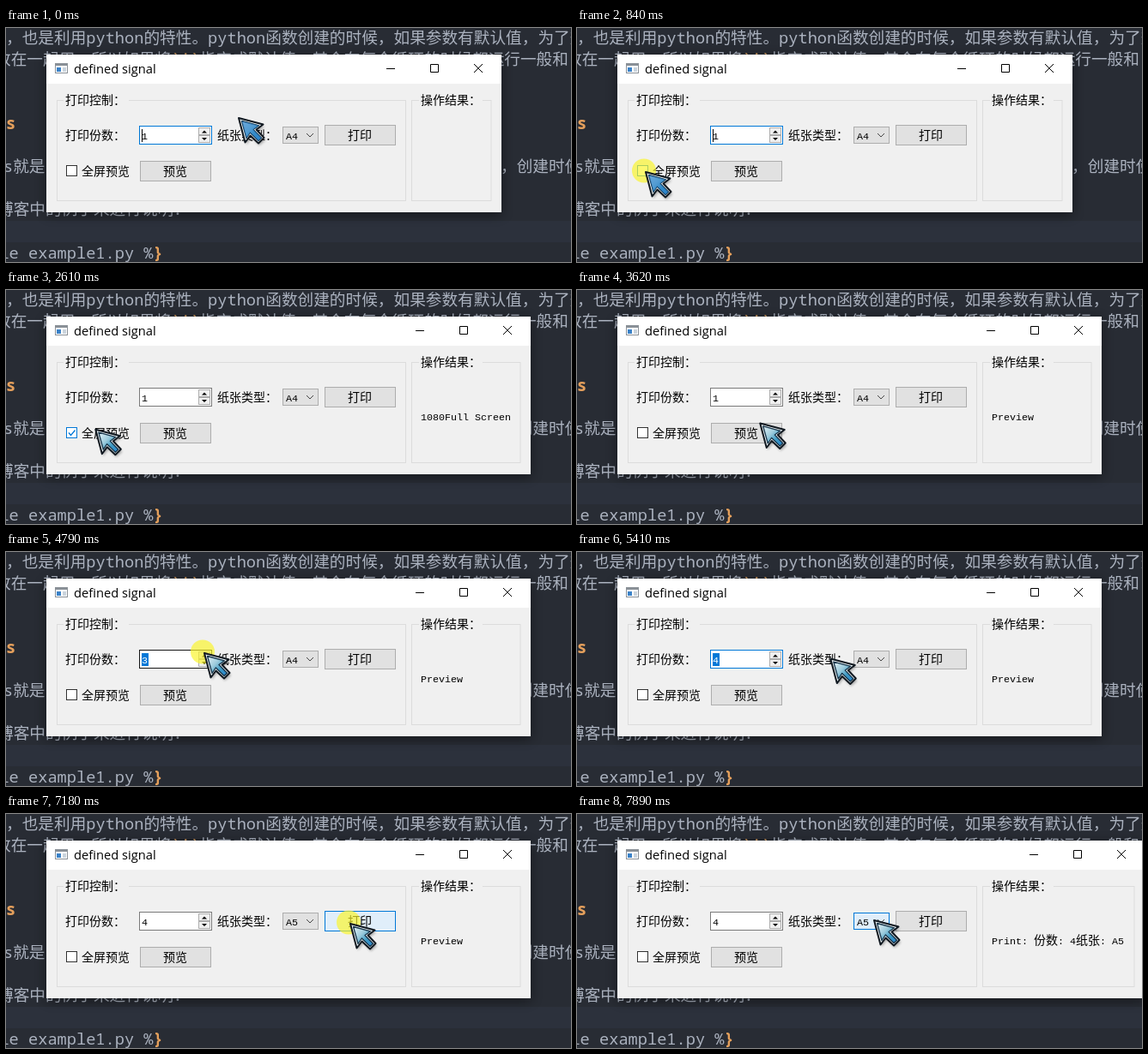
Write an HTML page that moves like this. It is 658 px wide and 273 px high and loops after 8000 ms.

```html
<!DOCTYPE html>
<html lang="zh-CN">
<head>
<meta charset="utf-8">
<style>
  html, body { margin: 0; width: 100%; height: 100%; overflow: hidden; background: #282c34; }
  svg { display: block; width: 658px; height: 273px; }
  text { white-space: pre; }
  .code { font: 18.67px "Noto Sans Mono", "Noto Sans CJK SC", monospace; fill: #abb2bf; }
  .code .hot { fill: #e5a05c; font-weight: 700; }
  .title { font: 14.7px "Open Sans", sans-serif; }
  .cjk { font: 14px "Noto Sans CJK SC", sans-serif; }
  .latin { font: 11.67px "Liberation Mono", monospace; }
  .line { fill: none; stroke: #000; }
  .group { fill: none; stroke: #dcdcdc; }
  .edge { stroke: #adadad; }
</style>
</head>
<body>
<svg id="stage" viewBox="0 0 658 273"></svg>
<script>
const LOOP = 8000;
const BLUE = '#0078d7';
const stage = document.getElementById('stage');

// Interface text: wide characters and half-width ones use two fonts on one pitch.
const runs = s => s.replace(/[\u2e80-\uffff]+|[^\u2e80-\uffff]+/g, run =>
  `<tspan class="${run.charCodeAt(0) > 0x2e7f ? 'cjk' : 'latin'}">${run}</tspan>`);
const label = (x, y, s, id = '') => `<text id="${id}" x="${x}" y="${y}">${runs(s)}</text>`;
const code = (x, row, s) => `<text class="code" x="${x}" y="${17.5 + row * 25.1}">${s}</text>`;
const box = (x, y, w, h, attrs = '') =>
  `<rect x="${x}" y="${y}" width="${w}" height="${h}" ${attrs}/>`;
const button = (id, x, y, s) =>
  box(x + .5, y + .5, 82, 23, `id="${id}" class="edge" fill="#e1e1e1"`) + label(x + 27, y + 17, s);

stage.innerHTML = `
<defs>
  <linearGradient id="sheen" x1="0" y1="0" x2="1" y2="1">
    <stop offset="0" stop-color="#e4f1f6"/><stop offset=".4" stop-color="#9ccbdc"/>
    <stop offset=".65" stop-color="#3f9bc4"/><stop offset="1" stop-color="#2583d0"/>
  </linearGradient>
  <filter id="soft" x="-20%" y="-30%" width="140%" height="160%"><feGaussianBlur stdDeviation="7"/></filter>
  <filter id="faint" x="-30%" y="-30%" width="160%" height="160%"><feGaussianBlur stdDeviation="1.6"/></filter>
</defs>
${box(0, 0, 658, 273, 'fill="#282c34"')}
${box(0, 225, 658, 25, 'fill="#2c313c"')}
${code(0, 0, '，也是利用python的特性。python函数创建的时候，如果参数有默认值，为了效')}
${code(-13, 1, '致在一起用，所以如果将<tspan fill="#c8965f">`i`</tspan>指定成默认值，其会在每个循环的时候都运行一般和')}
${code(0, 4, '<tspan class="hot">s</tspan>')}
${code(-3, 6, 's就是(')}
${code(576, 6, '，创建时使')}
${code(-10, 8, '博客中的例子来进行说明：')}
${code(-7.6, 10, 'le example1.py %<tspan class="hot">}</tspan>')}

${box(47, 34, 530, 184, 'id="shadow" fill="#000" opacity=".45" filter="url(#soft)"')}
${box(47, 31, 530, 184, 'id="body" fill="#f0f0f0"')}
${box(47, 31, 530, 34, 'id="bar" fill="#fff"')}
${box(57.5, 41.5, 14, 11, 'fill="#fff" stroke="#8a9097"')}
${box(57, 41, 15, 3, 'fill="#8a9097"')}
${box(59, 46, 5, 5, 'fill="#3b82c8"')}
${box(66, 46, 4, 5, 'fill="#c9d3dc"')}
<text class="title" x="79" y="53">defined signal</text>
<g id="caption" class="line"><path d="M-134 47.500h10M-82.500 42.500h9v9h-9zM-32 42l10 10m0-10l-10 10"/></g>

${box(59.5, 84.5, 406, 117, 'class="group"')}
${box(472.5, 84.5, 92, 117, 'id="results" class="group"')}
${box(67, 80, 76, 10, 'fill="#f0f0f0"')}
${box(481, 80, 74, 10, 'fill="#f0f0f0"')}
${label(69, 89, '打印控制：')}
${label(483, 89, '操作结果：')}
${label(69, 130, '打印份数：')}
${label(246, 130, '纸张类型：')}
${label(483, 152, '', 'result')}

${box(155.5, 114.500, 84, 21, 'id="spin" fill="#fff"')}
${box(158, 118, 8, 15, `id="selection" fill="${BLUE}"`)}
${label(158, 130, '1', 'count')}
${box(158, 118, 1, 15, 'id="caret"')}
${box(224.5, 116.5, 13, 8, 'fill="#f0f0f0" class="edge"')}
${box(224.5, 125.5, 13, 8, 'fill="#f0f0f0" class="edge"')}
<path d="M228 122.500l3-3 3 3zM228 128l3 3 3-3z"/>

${box(322.5, 115.500, 41, 19, 'id="combo" class="edge" fill="#e1e1e1"')}
${label(326, 130, 'A4', 'paper')}
<path class="line" d="M350 123l4 4 4-4" style="stroke:#444"/>
${button('print', 371, 113, '打印')}
${box(70.5, 160.500, 12, 12, 'id="check" fill="#fff"')}
<path id="tick" class="line" d="M73 166.500l2.500 3 5-6" stroke-width="1.300"/>
${label(88, 172, '全屏预览')}
${button('preview', 156, 155, '预览')}

<g id="popup">
  ${box(326, 139, 42, 29, 'opacity=".4" filter="url(#faint)"')}
  ${box(322.5, 135.5, 41, 28, 'fill="#fff" stroke="#646464"')}
  ${box(323, 136, 40, 14, `id="choice" fill="${BLUE}"`)}
  ${label(326, 147, 'A4', 'itemA4')}
  ${label(326, 161, 'A5', 'itemA5')}
</g>
<circle id="halo" r="14" fill="#fbf52a" opacity=".68"/>
<g id="cursor" stroke-linejoin="round">
  <path d="M2 3L31 11 23 17 32 27 25 33 16 24 10 32Z" opacity=".3" filter="url(#faint)"/>
  <path d="M1 1L29.500 8.500 21.500 14.500 30.500 24 24 30.500 14.500 21.500 8.500 29.500Z" fill="#f4fafc" stroke="#101820" stroke-width="2"/>
  <path id="core" d="M4.500 4.500L24.500 9.800 18 14.500 27.500 24.300 24 27.500 14.300 18 10 24.500Z" fill="url(#sheen)" stroke="#173449" stroke-width="1.300"/>
  <path id="tint" d="M4.500 4.500L24.500 9.800 18 14.500 27.500 24.300 24 27.500 14.300 18 10 24.500Z" fill="#2c82cc"/>
</g>`;

const el = {};
stage.querySelectorAll('[id]').forEach(node => { if (node.id) el[node.id] = node; });
const set = (id, attrs) => { for (const k in attrs) el[id].setAttribute(k, attrs[k]); };
const show = (id, on) => set(id, { visibility: on ? 'visible' : 'hidden' });
const write = (id, s) => {
  if (el[id].textContent !== s) el[id].innerHTML = runs(s);
};

// Each move: first step, last step, number of steps, where the pointer ends.
const moves = [
  [70, 840, 11, 79, 167],
  [910, 1310, 6, 204, 173],
  [2150, 2920, 11, 88, 160],
  [3076, 3228, 3, 204, 173],
  [3550, 4320, 11, 229, 117],
  [4390, 4390, 1, 230, 117],
  [5170, 5950, 11, 338, 128],
  [6107, 6260, 3, 340, 142],
  [6410, 6410, 1, 340, 151],
  [6490, 7100, 9, 400, 127],
  [7420, 7890, 7, 345, 123]
];
const clicks = [[840, 910], [1460, 1540], [3000, 3076], [3304, 3380], [4790, 4870], [4950, 5020], [7180, 7270]];

function pointer(t) {
  let x = 270, y = 104;
  for (const [start, end, steps, toX, toY] of moves) {
    if (t < start) break;
    const gap = (end - start) / (steps - 1 || 1) || 1;
    const u = Math.min(1, (Math.floor((t - start) / gap + .1) + 1) / steps);
    const k = 1 - (1 - u) ** 2;
    x += (toX - x) * k;
    y += (toY - y) * k;
  }
  return { x, y };
}

// Value of the last [time, value] pair already reached.
const latest = (t, ...pairs) => pairs.filter(p => t >= p[0]).pop()[1];

function render(t) {
  const { x, y } = pointer(t);
  const over = (l, top, r, b) => x >= l && x <= r && y >= top && y <= b;
  const face = (id, hot) => set(id, {
    fill: hot ? '#e0eefa' : '#e1e1e1',
    style: `stroke:${hot ? BLUE : '#adadad'}`
  });

  const right = latest(t, [0, 577], [1540, 611], [7270, 661]);
  for (const id of ['shadow', 'body', 'bar']) set(id, { width: right - 47 });
  set('results', { width: right - 12 - 472.5 });
  set('caption', { transform: `translate(${right})` });
  write('result', latest(t, [0, ''], [1540, '1080Full Screen'], [3380, 'Preview'], [7270, 'Print: 份数: 4纸张: A5']));

  const selected = t >= 4390 && t < 6030;
  const focused = t < 910 || selected;
  const spinHot = over(155, 114, 240, 136);
  set('spin', { stroke: spinHot ? '#171717' : focused ? BLUE : '#7a7a7a' });
  write('count', latest(t, [0, '1'], [4390, '2'], [4790, '3'], [4950, '4']));
  set('count', { fill: selected ? '#fff' : '#000' });
  show('selection', selected);
  show('caret', t < 910);

  const open = t >= 6030 && t < 6490;
  const second = y >= 150;
  face('combo', open || over(322, 115, 364, 135));
  write('paper', t < 6490 ? 'A4' : 'A5');
  show('popup', open);
  set('choice', { y: second ? 150 : 136, height: second ? 13 : 14 });
  set('itemA4', { fill: second ? '#000' : '#fff' });
  set('itemA5', { fill: second ? '#fff' : '#000' });

  face('print', over(371, 113, 454, 137));
  face('preview', over(156, 155, 239, 179));
  const checkHot = over(70, 156, 146, 178);
  set('check', { stroke: checkHot ? BLUE : '#333' });
  set('tick', { style: `stroke:${checkHot ? BLUE : '#222'}` });
  show('tick', t >= 910 && t < 3076);

  show('halo', clicks.some(([on, off]) => t >= on && t < off));
  set('halo', { cx: x - 1, cy: y - .5 });
  set('cursor', { transform: `translate(${x} ${y})` });
  set('tint', { opacity: latest(t, [0, .65], [910, 0], [5950, .6], [6490, 0]) });
}

function frame(now) {
  render(now % LOOP);
  requestAnimationFrame(frame);
}
render(0);
requestAnimationFrame(frame);
</script>
</body>
</html>
```
